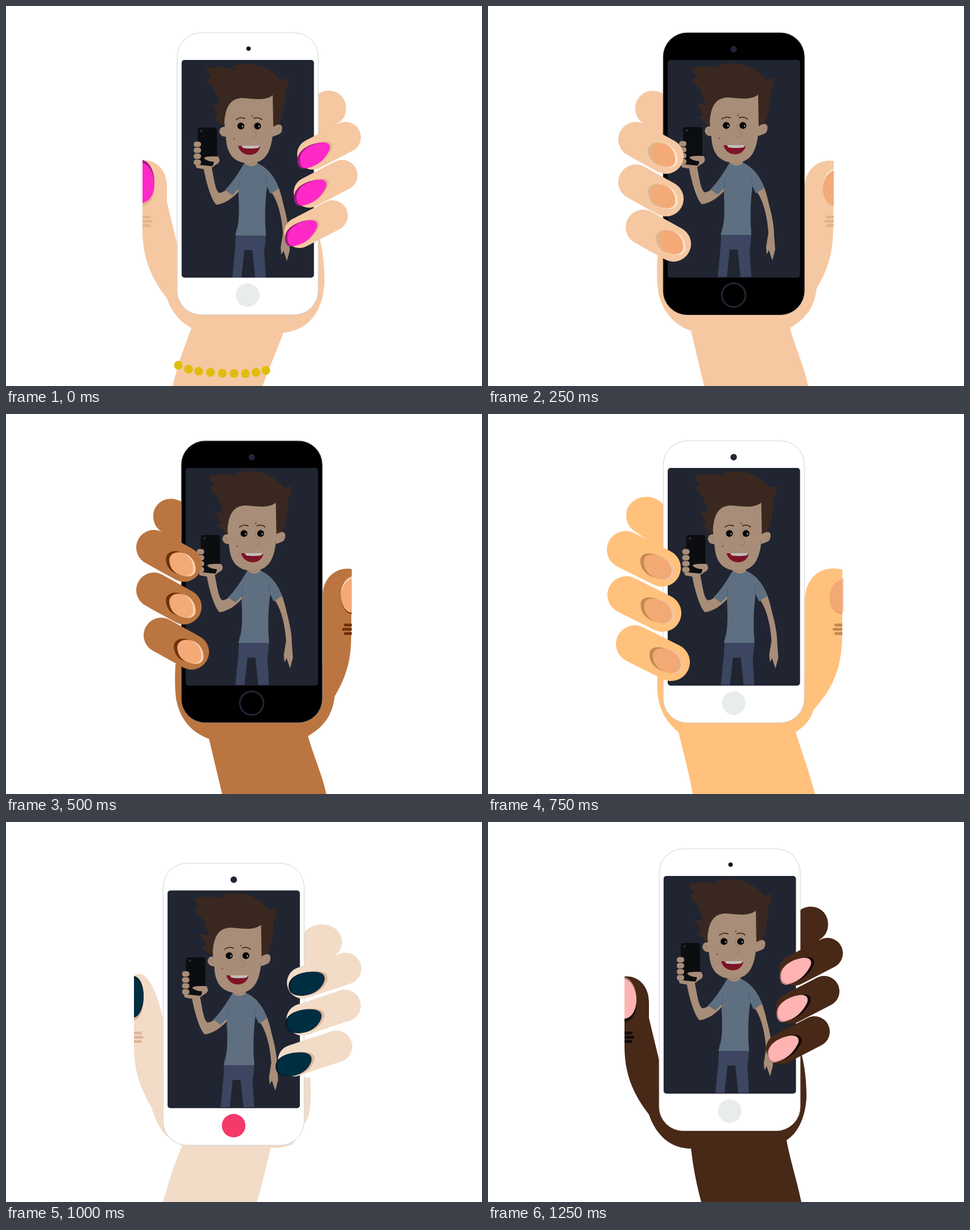
Animation of 837 by 669 pixels, one loop 1.5 s. Source, as an HTML page:

```html
<!DOCTYPE html>
<html lang="en">
<head>
<meta charset="utf-8">
<title>Phone selfie</title>
<style>
html, body { margin: 0; width: 100%; height: 100%; overflow: hidden; background: #fff; }
svg { display: block; width: 837px; height: 669px; }
</style>
</head>
<body>
<svg id="stage" viewBox="0 0 837 669"></svg>
<script>
const STEP = 250;
const stage = document.getElementById('stage');

const path = (d, fill) => `<path d="${d}" fill="${fill}"/>`;
const line = (d, color, width) =>
  `<path d="${d}" fill="none" stroke="${color}" stroke-width="${width}" stroke-linecap="round"/>`;
const dot = (x, y, r, fill) => `<circle cx="${x}" cy="${y}" r="${r}" fill="${fill}"/>`;
const box = (x, y, w, h, r, fill, extra = '') =>
  `<rect x="${x}" y="${y}" width="${w}" height="${h}" rx="${r}" fill="${fill}" ${extra}/>`;
const at = ([x, y], body) => `<g transform="translate(${x} ${y})">${body}</g>`;

// The person on the screen, dressed in a T-shirt and trousers
function person() {
  const skin = '#a88d78', fold = '#927a68', hair = '#3a2820';
  const shirt = '#5d6f80', seam = '#4d5d6d', cloth = '#3d4660';
  const knuckles = [243.5, 254, 264.5, 275].map(y => box(330, y - 4.8, 13, 9.6, 4.5, skin)).join('');
  return [
    path('M383 213C376 205 370 203 365 196L374 194L361 173L377 175L368 150L352 129L362 128L351 111Q380 102 404 113L398 106Q435 93 470 117L484 131Q492 127 499 129L493 135L499 147L491 146Q492 180 479 212L470 214Z', hair),
    // arms
    path('M420 278C405 300 392 328 375 329C368 325 366 305 361 281L347 284C352 310 360 340 370 350C385 348 400 338 412 323Z', skin),
    path('M444 278C465 288 480 310 488 350C494 372 497 390 497 403L499 430L494 449L488 431L484 438L483 425L487 400C485 370 478 345 468 330L459 312Z', skin),
    // trousers
    path('M405 392H457C457 415 455 425 454 432L457 478H438L433 430H419L414 478H398L403 425Z', cloth),
    // shirt and sleeves
    path('M419 277Q431 286 443 277C455 285 470 294 480 321L465 331L459 318C455 350 455 376 457 404H403C406 396 408 386 409 376C411 350 408 335 409 322L398 333L385 324C400 309 408 294 419 277Z', shirt),
    line('M409 322L411 306M459 318L457 304', seam, 1),
    path('M420 274H442V278Q431 286 420 278Z', skin),
    // head
    path('M387 213Q376 211 375 221Q377 231 388 230ZM469 213Q484 204 485.500 214Q486 225 477 227L469 230Z', skin),
    path('M384 205C386 175 396 163 415 162C435 163 455 168 469 157L470 215C468 250 460 276 430 277C400 277 389 260 387 235Z', skin),
    line('M418 277Q431 280 442 275', fold, 0.8),
    line('M379 219Q384 217 384 225M477 218Q482 214 483 219', fold, 0.8),
    line('M405 200Q412 194.500 420 198M436 198Q444 194.500 450 200', '#15100d', 1.4),
    dot(413, 211.3, 6.1, '#080808'), dot(442.3, 211.3, 6.1, '#080808'),
    dot(416, 212, 1.3, '#bbb'), dot(445, 212, 1.3, '#bbb'),
    line('M434 206Q429 215 436 219M431 231Q441 235 440 226Q439 222 436 218', fold, 1),
    dot(433.5, 193.5, 1.5, '#964539'), dot(401, 234, 1.4, '#964539'),
    path('M408 246H447C446 256 438 262 428 262C418 262 410 255 408 246Z', '#7d1426'),
    path('M414 246H447L443 250Q430 252 417 250Z', '#c3bfbd'),
    // handset
    box(337, 214, 34, 68, 4.5, '#0c0d11'), dot(343.5, 220, 2, '#33353d'), knuckles,
    path('M348 268Q350 264 373 265Q378 272 373 277L361 285L346 287L335 285L333 279L362 282Q366 279 365 274Q355 274 348 268Z', skin)
  ].join('');
}

// Capsule fingers, each with a nail made of one outline in three layers
function fingers(s) {
  const { tips, nails, reach, width, nail } = s.grip;
  const layers = ['shade', 'edge', 'nail'].map((key, i) => at(s.shift[i], path(nail, s[key]))).join('');
  return tips.map(([x, y], i) =>
    line(`M${x} ${y}l${reach[0]} ${reach[1]}`, s.skin, width) + at(nails[i], layers)).join('');
}

const rightGrip = {
  tips: [[539, 261], [533, 328], [516, 399]], reach: [58, -30], width: 54,
  nails: [[0, 0], [-6, 65.5], [-22, 137]],
  nail: 'M517 272C516 254 536 243 556 240C569 239 573 247 567 257C560 270 549 281 530 285.500C522 287 517 281 517 272Z',
  index: 'M549 155C569 141 598 153 598 180C598 194 591 202 583 207L549 250Z'
};
const leftGrip = {
  tips: [[313, 264.5], [313, 339.5], [326, 419]], reach: [-53, -29.5], width: 62,
  nails: [[0, 0], [0, 73], [14, 154]],
  nail: 'M287 255C288 243 300 239 312 243C324 248 331 262 329 274C326 284 315 285 303 280C294 276 288 268 287 255Z',
  index: 'M308 154C284 141 259 156 259 180C259 192 264 200 273 207L308 240Z'
};
const wideGrip = {
  tips: [[306, 271], [307, 350.5], [322, 437]], reach: [-64, -32], width: 66,
  nails: [[0, 0], [0.5, 77.5], [16, 165]],
  nail: 'M274 258C276 246 290 246 302 250C317 255 326 270 322 282C318 292 305 293 293 288C283 283 273 274 274 258Z',
  index: 'M308 159C285 133 243 148 243 178C243 192 250 202 260 208L308 240Z'
};
const slimGrip = {
  tips: [[522, 283], [521, 348], [506, 420]], reach: [75, -25], width: 56,
  nails: [[0, 0], [-5.5, 66], [-23, 142]],
  nail: 'M500 287C501 272 520 263.500 540 263.500C557 263.500 562 270 560 279C556 293 542 304 524 305.500C508 306 499 299 500 287Z',
  index: 'M524 194C550 168 591 182 591 212C590 224 584 232 575 236L524 260Z'
};

const leftThumb = 'M240 272C264 270 283 288 283 318V345L301 420V500H549V400C558 430 560 460 560 485';
const leftEdge = 'C260 485 240 450 240 395Z';
const palmA = `${leftThumb}C558 535 535 570 488 575L451 669H293Q302 635 303 630L326 567Q295 550 283 515${leftEdge}`;
const palmB = `${leftThumb}C558 520 545 548 525 560C530 590 543 630 551 669H375C367 640 361 610 357 575C320 575 295 550 283 515${leftEdge}`;
const palmC = 'M608 273C580 268 557 290 557 318V440H298C296 480 298 498 301 510C309 542 330 562 357 572L380 669H563C558 640 540 600 531 567C560 550 574 530 578 497C600 460 607 430 607 390Z';
const palmD = 'M623 274C585 265 557 288 557 330V460H298C296 490 297 530 335 560C342 590 353 630 360 669H575C565 630 550 590 541 560C560 548 568 535 573 520C612 477 623 440 623 380Z';
const palmE = 'M225 271C245 256 263 291 276 345V450H535C537 490 536 522 524 531L505 567Q485 575 465 574C457 610 450 640 441 669H276C286 635 296 600 310 570L290 558Q268 545 256 503C235 465 225 440 225 390Z';

const thumbA = 'M240 276C255 280 261 300 261 315C260 335 250 346 240 346Z';
const thumbB = 'M608 290C594 295 588 310 589 325C592 342 600 350 608 350Z';
const thumbD = 'M623 291C605 296 600 312 601 328C605 344 612 350 623 351Z';
const thumbE = 'M225 274C238 277 242 295 242 310C241 330 233 344 225 344Z';

const beads = [[303, 632.5], [321, 639.5], [339, 643], [359.5, 645], [380.5, 646.5],
  [401, 647], [421, 647], [439.5, 645], [457, 641.5]];

const white = { body: '#fff', rim: '#cfd0d1', home: '#e8ecec' };
const black = { body: '#000', rim: '#222529', home: null, lens: [432, 76, 5.7, '#232336'] };

// shift: moves of the shade, edge and nail layers
// thumb: nail outline, cut edge x, inward direction, moves of shade and edge
const scenes = [
  { ...white, pos: [301, 47.2], lens: [426.5, 75, 3.8, '#000'], man: [0, 0],
    grip: rightGrip, palm: palmA, skin: '#f5c8a2', shade: '#e0b78d', edge: '#a11a80', nail: '#ff29c8',
    shift: [[4, -2], [-4.5, 0.5], [0, 0]], thumb: [thumbA, 240, 1, [0, 6], [0, -5]], beads },
  { ...black, pos: [308.2, 47.2], man: [6, -1],
    grip: leftGrip, palm: palmC, skin: '#f5c8a2', shade: '#dfb68b', edge: '#fbe2cf', nail: '#f4aa77',
    shift: [[-6, -1], [4, 1], [0, 0]], thumb: [thumbB, 608, -1, [0, 2], [0, -4]] },
  { ...black, pos: [308.2, 47.2], rim: '#77777a', man: [5.5, -1],
    grip: leftGrip, palm: palmC, skin: '#bb7540', shade: '#6e3208', edge: '#fbd0b0', nail: '#f4aa77',
    shift: [[-6, 0], [4, 3], [0, 2]], thumb: [thumbB, 608, -1, [0, 2], [0, -4]] },
  { ...white, pos: [308.2, 47.2], lens: [432, 76, 5.7, '#1f2533'], man: [11.5, -1],
    grip: wideGrip, palm: palmD, skin: '#ffc17c', shade: '#c48a4e', edge: '#f3c4a4', nail: '#f3a974',
    shift: [[-6, -2], [4.5, 0.5], [0, 0]], thumb: [thumbD, 623, -1, [0, 1], [2, -2]] },
  { ...white, pos: [276.3, 72.7], home: '#f53968', lens: [400.5, 101.5, 5.7, '#20243a'], man: [-20.5, 24],
    grip: slimGrip, palm: palmE, skin: '#f2dcc8', shade: '#e0b699', edge: '#001c28', nail: '#002e41',
    shift: [[5, -1], [-3, 0.5], [0, 0]], thumb: [thumbE, 225, 1, [0, 5], [0, -3]] },
  { ...white, pos: [301, 47.2], lens: [426.5, 75, 3.8, '#000'], man: [2, -1],
    grip: rightGrip, palm: palmB, skin: '#482817', shade: '#120b07', edge: '#b87f7d', nail: '#ffb3b3',
    shift: [[4, -2], [-3.5, 1], [-1.5, -1]], thumb: [thumbA, 240, 1, [0, 6], [0, -3]] }
];

function thumbDetails(s) {
  const [shape, cut, dir, low, high] = s.thumb;
  const wrinkles = [[369, 14], [376.5, 17], [384, 14]].map(([y, w]) => {
    const end = cut + dir * w;
    return path(`M${cut} ${y}H${end - dir * 2}q${dir * 2} 0 ${dir * 2} 2.500t${-dir * 2} 2.500H${cut}Z`, s.shade);
  }).join('');
  return at(low, path(shape, s.shade)) + at(high, path(shape, s.edge)) + path(shape, s.nail) + wrinkles;
}

function phone(s, id) {
  const [x, y] = s.pos;
  const button = s.home
    ? dot(x + 124, y + 461.8, 20.7, s.home)
    : `<circle cx="${x + 123.8}" cy="${y + 461.8}" r="20.800" fill="none" stroke="#242536" stroke-width="3"/>`;
  const screen = fill => box(x + 7.8, y + 47.8, 232.7, 383.2, 5, fill);
  return box(x, y, 248, 496.3, 42, s.body, `stroke="${s.rim}" stroke-width="1"`) +
    dot(...s.lens) + button + screen('#202531') +
    `<clipPath id="${id}">${screen('#000')}</clipPath>` +
    `<g clip-path="url(#${id})">${at(s.man, person())}</g>`;
}

stage.innerHTML = scenes.map((s, i) => '<g visibility="hidden">' +
  path(s.grip.index, s.skin) + path(s.palm, s.skin) + thumbDetails(s) +
  (s.beads || []).map(([x, y]) => dot(x, y, 7.7, '#e0bd0c')).join('') +
  phone(s, 'screen' + i) + fingers(s) + '</g>').join('');

const groups = [...stage.children];
const start = performance.now();
let shown = -1;

function draw(now) {
  const next = Math.floor(Math.max(0, now - start) / STEP) % groups.length;
  if (next !== shown) {
    groups.forEach((g, i) => g.setAttribute('visibility', i === next ? 'visible' : 'hidden'));
    shown = next;
  }
  requestAnimationFrame(draw);
}
draw(start);
</script>
</body>
</html>
```
